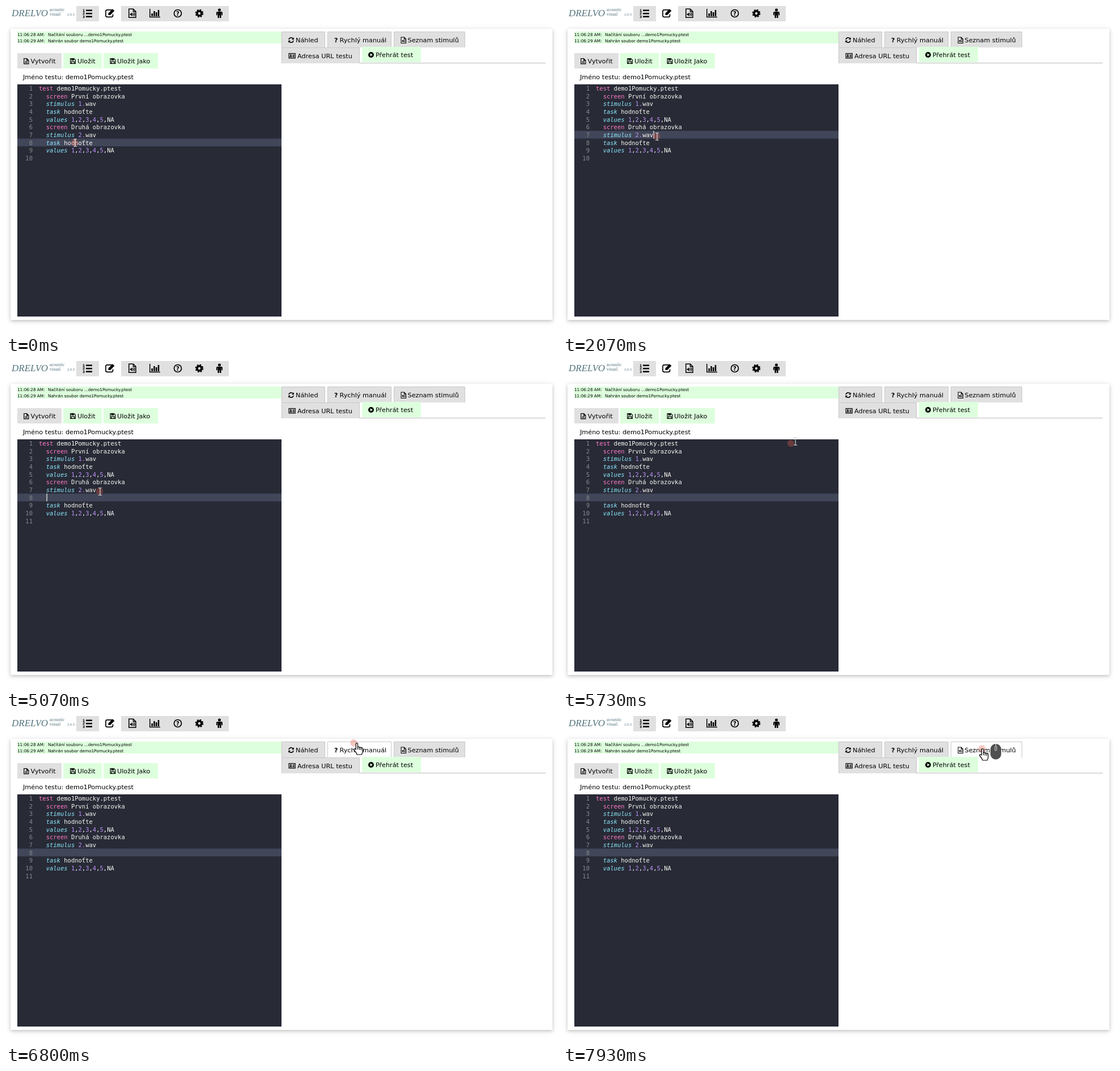
Recreate the animation shown at these times as an HTML page. Size 972 by 576 pixels, loop 8000 ms.

```html
<!DOCTYPE html>
<html lang="cs">
<head>
<meta charset="utf-8">
<title>Editor testu</title>
<style>
  html, body { margin: 0; width: 100%; height: 100%; overflow: hidden; background: #fff; }
  .card { position: absolute; left: 8px; top: 40px; width: 956px; height: 513px; background: #fff;
    box-shadow: 0 2px 5px rgba(0,0,0,.16), 0 2px 10px rgba(0,0,0,.12); }
  svg { position: absolute; left: 0; top: 0; }
  text { font: 11.25px "DejaVu Sans", sans-serif; white-space: pre; }
  .brand text { font-family: "Liberation Serif", serif; fill: #54737e; }
  .log text { font-size: 7.25px; }
  .mono text { font: 10.5px "DejaVu Sans Mono", monospace; fill: #f8f8f2; }
  .mono .num { fill: #858b8d; text-anchor: end; }
  .line { fill: none; stroke: #000; }
  .bold { font-weight: bold; }
  .key { fill: #ff79c6; }
  .attr { fill: #8be9fd; font-style: italic; }
  .digit { fill: #bd93f9; }
</style>
</head>
<body>
<div class="card"></div>
<svg id="stage" width="972" height="576" viewBox="0 0 972 576">
  <defs>
    <g id="audio">
      <path class="line" stroke-width="1.5" d="M.8.8H8.5L13 5.300V15.700H.8ZM8.500.8V5.300H13"/>
      <path d="M2.800 9H4.300L6.800 6.800V13.800L4.300 11.500H2.800Z"/>
      <path class="line" stroke-width="1.200" d="M8 8.500q1.500 1.800 0 3.600M9.500 7q3 3.300 0 6.600"/>
    </g>
    <g id="page">
      <path class="line" stroke-width="1.200" d="M.7.7H5.700L8.800 3.800V9.800H.7ZM5.700.7V3.800H8.800M2.500 5.500H7M2.500 7.600H7"/>
    </g>
    <g id="disk">
      <path class="line" stroke-width="1.200" d="M.6.6H7L9.400 3V9.400H.6ZM2.500 9V5.900H7.500V9"/>
      <path d="M2.200.6H6.800V3.800H2.200Z"/>
    </g>
    <g id="refresh">
      <path class="line" stroke-width="1.600" d="M.9 4.200A4.200 4.200 0 0 1 8.300 2.300M9.100 5.800A4.200 4.200 0 0 1 1.700 7.700"/>
      <path d="M9.800.3V4.200H5.900ZM.2 9.700V5.800H4.100Z"/>
    </g>
    <g id="idcard">
      <path class="line" stroke-width="1.200" d="M.6.6H11.700V8.800H.6ZM7 3.300H10.300M7 5H10.300M7 6.700H10.300"/>
      <circle cx="3.900" cy="3.500" r="1.400"/>
      <path d="M1.700 7.200Q1.700 5 3.900 5T6.100 7.200Z"/>
    </g>
    <g id="play">
      <circle cx="5" cy="5" r="5"/>
      <path fill="#dfd" d="M3.600 2.300L7.900 5L3.600 7.700Z"/>
    </g>
  </defs>

  <g class="brand">
    <text x="10" y="18" style="font-size:17px;font-style:italic">DRELVO</text>
    <text x="77" y="9" style="font-size:8px">acoustic</text>
    <text x="77" y="17" style="font-size:8px">visual</text>
    <text x="108" y="17" style="font-size:6.500px">2.0.3</text>
  </g>

  <path fill="#e0e0e0" d="M124 0H164V27H124ZM203 0H393V27H203Z"/>
  <g id="nav">
    <path d="M141 6.500H152V8.900H141ZM141 12H152V14.400H141ZM141 17.500H152V19.900H141Z"/>
    <g id="digits"></g>
    <path class="line" stroke-width="1.700" d="M187 6.800H178.500Q176 6.800 176 9.300V17Q176 19.300 178.500 19.300H186Q188.500 19.300 188.500 17V14.500"/>
    <path d="M180.500 16V12.700L188 5.200L191.400 8.600L184 16Z"/>
    <use href="#audio" x="216" y="4.500"/>
    <path class="line" stroke-width="1.500" d="M253.800 5V19.500H272"/>
    <path d="M256.500 13H259V18H256.500ZM260.300 9H262.800V18H260.300ZM264 11H266.500V18H264ZM267.800 7H270.300V18H267.800Z"/>
    <circle class="line" cx="303" cy="13" r="6.500" stroke-width="1.700"/>
    <text class="bold" x="300" y="16.800" style="font-size:10px">?</text>
    <circle class="line" cx="341" cy="13" r="4" stroke-width="3.600"/>
    <circle class="line" cx="341" cy="13" r="6" stroke-width="2.600" stroke-dasharray="2.600 2.112"/>
    <circle cx="376.500" cy="7" r="2.500"/>
    <path d="M373 10H380Q382 10 382 12V16.200H380.200V12.500H379.500V21H377V16.500H376V21H373.500V12.500H372.800V16.200H371V12Q371 10 373 10Z"/>
  </g>

  <g class="log">
    <path fill="#dfd" d="M20 45H486V66H20Z"/>
    <text x="20" y="53">11:06:28 AM:</text><text x="74" y="53">Načítání souboru ...demo1Pomucky.ptest</text>
    <text x="20" y="64">11:06:29 AM:</text><text x="74" y="64">Nahrán soubor demo1Pomucky.ptest</text>
  </g>

  <path fill="#e0e0e0" d="M20 83H98V110H20Z"/>
  <path fill="#dfd" d="M101 83H169V110H101ZM172 83H268V110H172Z"/>
  <use href="#page" x="31" y="92"/><text x="43.500" y="101">Vytvořit</text>
  <use href="#disk" x="113" y="92"/><text x="126" y="101">Uložit</text>
  <use href="#disk" x="183.500" y="92"/><text x="196" y="101">Uložit Jako</text>
  <text x="30" y="128.500">Jméno testu: demo1Pomucky.ptest</text>

  <path class="line" style="stroke:#bbb" d="M624 100.500H952"/>
  <g id="tabs"></g>
  <path fill="#dfd" d="M628 72H732V99H628Z"/>
  <use href="#refresh" x="498" y="55"/><text x="511" y="64">Náhled</text>
  <text class="bold" x="579" y="64" style="font-size:11px">?</text><text x="588.500" y="64">Rychlý manuál</text>
  <use href="#audio" transform="translate(696.500 54.500) scale(.7)"/><text x="708.500" y="64">Seznam stimulů</text>
  <use href="#idcard" x="498.500" y="83"/><text x="514" y="91.500">Adresa URL testu</text>
  <use href="#play" x="639" y="81"/><text x="652" y="90">Přehrát test</text>

  <path fill="#282a36" d="M20 138H486V547H20Z"/>
  <rect id="active" x="20" width="466" height="13.650" fill="#424659"/>
  <g class="mono"><g id="gutter"></g><g id="head"></g><g id="tail"></g></g>
  <rect id="caret" width="1.200" height="13.650" fill="#f8f8f2"/>

  <circle id="halo" r="6.200" fill="#e15f4b" fill-opacity=".34"/>
  <g id="pointer">
    <path id="beam" class="line" style="stroke:#d4d4d4" stroke-width="1.200" d="M-3-6.500H-1L0-5.500L1-6.500H3M0-5.500V5.500M-3 6.500H-1L0 5.500L1 6.500H3"/>
    <path id="arrow" fill="#fff" stroke="#000" d="M0 0V15L3.500 11.700L5.900 17L8.100 16L5.700 10.800H11Z"/>
    <path id="hand" fill="#fff" stroke="#000" stroke-width="1.200" stroke-linejoin="round"
      d="M-1.700 11V1.200A1.600 1.600 0 0 1 1.500 1.200V7.600A1.500 1.500 0 0 1 4.500 7.800A1.500 1.500 0 0 1 7.300 8.600A1.400 1.400 0 0 1 10 9.800V14Q10 17 8.300 20H.3Q-1 16.500-5.200 11.500Q-5.300 9.400-3.400 9.800ZM1.500 7.500V11M4.500 8V11.500M7.300 9V12"/>
    <g id="mouse" transform="translate(14 -9)">
      <rect width="19" height="27.500" rx="9.500" fill="#505050"/>
      <g id="press">
        <path fill="#cf4058" d="M9.500 0A9.500 9.500 0 0 0 0 9.500V13.500H9.500Z"/>
        <path class="line" style="stroke:#282a36" d="M0 14H19M9.500 0V14"/>
        <rect class="line" style="stroke:#777" width="19" height="27.500" rx="9.500" stroke-width=".8" stroke-dasharray="2 2"/>
      </g>
      <path class="line" style="stroke:#ddd" d="M9.500 0V4"/>
      <rect x="8" y="4" width="3" height="8" rx="1.500" fill="#505050" stroke="#ddd"/>
    </g>
  </g>
</svg>
<script>
const LOOP = 8000, STEP = 1000 / 15, ROW = 13.65, CHAR = 6.32;
const $ = id => document.getElementById(id);

function add(parent, tag, attrs, text) {
  const el = document.createElementNS('http://www.w3.org/2000/svg', tag);
  for (const name in attrs) el.setAttribute(name, attrs[name]);
  if (text !== undefined) el.textContent = text;
  parent.append(el);
  return el;
}

const top0 = row => 138 + (row - 1) * ROW;
const show = (id, on) => $(id).style.display = on ? '' : 'none';
const place = (id, x, y) => $(id).setAttribute('transform', `translate(${x} ${y})`);

[1, 2, 3].forEach((n, i) =>
  add($('digits'), 'text', { x: 135, y: 9.5 + i * 5.8, class: 'bold', style: 'font-size:6px' }, n));

// Code lines, coloured by keyword and number
const body = n => [
  `  screen ${n === 1 ? 'První' : 'Druhá'} obrazovka`,
  `  stimulus ${n}.wav`, '  task hodnoťte', '  values 1,2,3,4,5,NA'
];
const code = ['test demo1Pomucky.ptest', ...body(1), ...body(2)];
const kind = s => /^(test|screen)$/.test(s) ? 'key'
  : /^(stimulus|task|values)$/.test(s) ? 'attr'
  : /^\d\.?$/.test(s) ? 'digit' : '';

code.forEach((line, i) => {
  const src = line.trimStart();
  const el = add($(i < 7 ? 'head' : 'tail'), 'text',
    { x: 58 + (line.length - src.length) * CHAR, y: top0(i + 1) + 11 });
  for (const part of src.split(/(^\w+|\b\d\.?(?=[,w]))/).filter(Boolean))
    add(el, 'tspan', { class: kind(part) }, part);
});
const numbers = Array.from({ length: 11 }, (_, i) =>
  add($('gutter'), 'text', { class: 'num', x: 47, y: top0(i + 1) + 11 }, i + 1));

// x, y, width, height
const tabs = [[486, 45, 77, 28], [567, 45, 113, 28], [684, 45, 126, 28], [486, 73, 138, 28]]
  .map(([x, y, w, h]) => ({
    x, y, w, h,
    el: add($('tabs'), 'path', {
      d: `M${x + .5} ${y + h}V${y + .5}H${x + w - .5}V${y + h}`, stroke: '#c8c8c8'
    })
  }));

// time, x, y of the pointer tip
const path = [
  [0, 122, 241], [467, 122, 241], [933, 166, 230], [5200, 166, 230], [5333, 185, 247],
  [5600, 330, 185], [5800, 450, 120], [5933, 505, 88], [6067, 521, 64], [6133, 523, 59],
  [6400, 530, 56], [6733, 593, 47], [6800, 619, 48], [6933, 672, 52], [7267, 737, 61],
  [7467, 737, 61], [7667, 740, 58], [8000, 740, 58]
];
function at(t) {
  const i = Math.max(1, path.findIndex(p => p[0] >= t));
  const [a, b] = [path[i - 1], path[i]];
  const k = Math.max(0, (t - a[0]) / (b[0] - a[0]));
  return [a[1] + (b[1] - a[1]) * k, a[2] + (b[2] - a[2]) * k];
}

const blinks = [[0, 530], [930, 1530], [1930, 2530], [2930, 3530], [3930, 4670],
  [5070, 5600], [6130, 6660], [7200, 7660]];
const within = (t, a, b) => t >= a && t < b;

function draw(time) {
  // The picture is refreshed 15 times a second
  const t = Math.floor((time + 4) / STEP) * STEP % LOOP + 4;
  const [x, y] = at(t - 4);
  const [hx, hy] = at(Math.max(0, t - 16));
  const split = t >= 4070;
  const row = within(t, 1930, 4070) ? 7 : 8;

  $('active').setAttribute('y', top0(row));
  place('tail', 0, split ? ROW : 0);
  numbers[10].style.display = split ? '' : 'none';
  place('caret', t < 1930 ? 121.5 : split ? 71.5 : 159.5, top0(row));
  show('caret', blinks.some(([a, b]) => within(t, a, b)));

  let hover = false;
  for (const tab of tabs) {
    const over = within(x, tab.x, tab.x + tab.w) && within(y, tab.y, tab.y + tab.h);
    tab.el.setAttribute('fill', over ? '#fff' : '#e0e0e0');
    hover = hover || over;
  }
  const editing = x < 486 && y > 138;
  place('pointer', x, y);
  place('halo', hx - 1, hy - .5);
  show('halo', !within(t, 6070, 6200));
  show('beam', editing);
  show('hand', hover);
  show('arrow', !editing && !hover);
  show('mouse', within(t, 1870, 2070) || t >= 7930);
  show('press', t < 2070);
}

const start = performance.now();
function tick() {
  draw((performance.now() - start) % LOOP);
  requestAnimationFrame(tick);
}
tick();
</script>
</body>
</html>
```
